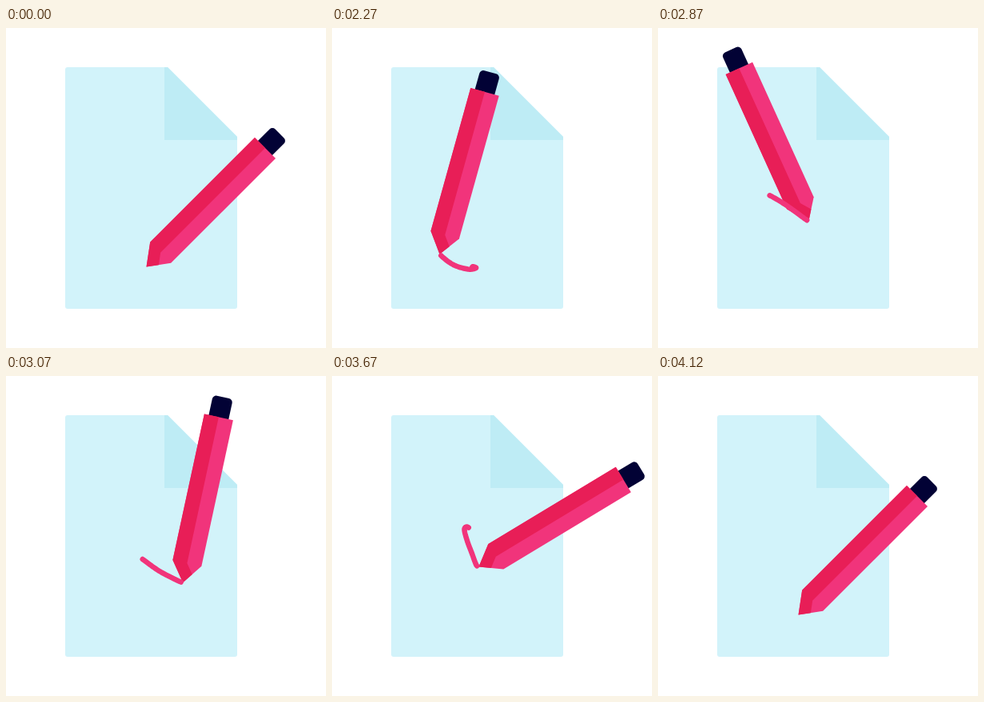
Recreate the animation shown at these times as an HTML page. Size 400 by 400 pixels, loop 4150 ms.

```html
<!DOCTYPE html>
<html lang="en">
<head>
<meta charset="utf-8">
<title>Pencil writing on a page</title>
<style>
  html, body { margin: 0; width: 100%; height: 100%; overflow: hidden; background: #fff; }
  svg { display: block; width: 100%; height: 100%; }
</style>
</head>
<body>
<svg viewBox="0 0 400 400">
  <path fill="#d2f3fa" d="M77 49H202L289 136V348Q289 351 286 351H77Q74 351 74 348V52Q74 49 77 49Z"/>
  <path fill="#beecf5" d="M198 49H202L289 136V140H198Z"/>
  <g id="pencil">
    <rect id="cap" x="-12.7" width="25.4" height="32" rx="5" fill="#020235"/>
    <path id="body" fill="#f1347b"/>
    <path id="shade" fill="#e81e57"/>
  </g>
  <path id="ink" fill="none" stroke="#f1347b" stroke-width="6.5" stroke-linecap="round" stroke-linejoin="round"/>
</svg>
<script>
const LOOP = 4150, START = 2020, END = 4095;
const TRAIL = 56, LAG = 2.5, STEP = 5;
const HALF = 18.4, POINT = 25;

// time, tip x, tip y
const tipKeys = [
  [1990, 175.5, 298.5], [2020, 176.5, 298.2], [2080, 180, 300], [2140, 170, 301.5],
  [2210, 150, 295], [2290, 130, 278], [2360, 115, 256], [2420, 104.5, 231],
  [2450, 103, 213], [2470, 105.3, 206], [2520, 107.5, 200.5], [2580, 112, 199],
  [2720, 137, 208], [2790, 158, 220], [2870, 188, 241.5], [2970, 207, 252],
  [3070, 221, 258.3], [3110, 222, 256], [3200, 208, 240], [3290, 191, 214],
  [3370, 173.3, 192.3], [3420, 168.5, 188.5], [3470, 165.5, 192], [3530, 169, 206],
  [3600, 175, 222], [3650, 180.5, 236.5], [3670, 183.3, 238.5], [3740, 190, 247],
  [3870, 190, 270], [4000, 181, 291], [END, 175.5, 298.5]
];
// time, degrees
const angleKeys = [
  [1990, 45], [2080, 42.5], [2180, 30], [2280, 14], [2370, -3], [2470, -18.5],
  [2520, -25], [2580, -27.5], [2720, -26.5], [2870, -24.5], [2970, -11],
  [3070, 12], [3200, 36], [3370, 55.5], [3520, 59.5], [3670, 58.9], [3870, 54], [END, 45]
];
// time, body length
const lengthKeys = [
  [1990, 185], [2290, 185], [2370, 170], [2470, 153.5], [2520, 143],
  [2580, 144], [2720, 155], [2790, 168], [2870, 185], [END, 185]
];

// Smooth curve through the keys; flat at both ends.
function spline(keys, t, c = 1) {
  const last = keys.length - 1;
  if (t <= keys[0][0]) return keys[0][c];
  if (t >= keys[last][0]) return keys[last][c];
  const i = keys.findIndex(k => k[0] > t) - 1;
  const slope = j => j <= 0 || j >= last ? 0 :
    (keys[j + 1][c] - keys[j - 1][c]) / (keys[j + 1][0] - keys[j - 1][0]);
  const a = keys[i], b = keys[i + 1], h = b[0] - a[0];
  const s = (t - a[0]) / h, s2 = s * s, s3 = s2 * s;
  return (2 * s3 - 3 * s2 + 1) * a[c] + (s3 - 2 * s2 + s) * h * slope(i) +
         (3 * s2 - 2 * s3) * b[c] + (s3 - s2) * h * slope(i + 1);
}

const tipAt = t => [spline(tipKeys, t, 1), spline(tipKeys, t, 2)];

// Tip path measured by distance travelled.
const trace = [];
for (let t = tipKeys[0][0], sum = 0; t <= END; t += STEP) {
  const [x, y] = tipAt(t), p = trace[trace.length - 1];
  if (p) sum += Math.hypot(x - p.x, y - p.y);
  trace.push({ x, y, sum });
}

function travelled(t) {
  const f = Math.min(Math.max((t - tipKeys[0][0]) / STEP, 0), trace.length - 1);
  const i = Math.floor(f), a = trace[i], b = trace[Math.min(i + 1, trace.length - 1)];
  return a.sum + (b.sum - a.sum) * (f - i);
}

function pointAt(d) {
  const i = Math.max(1, trace.findIndex(p => p.sum >= d));
  const a = trace[i - 1], b = trace[i], k = (d - a.sum) / (b.sum - a.sum || 1);
  return [a.x + (b.x - a.x) * k, a.y + (b.y - a.y) * k];
}

function inkPath(t) {
  const size = TRAIL * Math.min(1, Math.max(0, (END - 15 - t) / 260));
  const head = travelled(t) - LAG, tail = Math.max(0, head - size);
  if (t < START || head - tail < 1) return "";
  const mid = trace.filter(p => p.sum > tail && p.sum < head).map(p => [p.x, p.y]);
  return "M" + [pointAt(tail), ...mid, pointAt(head)]
    .map(p => p.map(n => n.toFixed(2)).join(" ")).join("L");
}

const $ = id => document.getElementById(id);
const pencil = $("pencil"), cap = $("cap"), body = $("body"), shade = $("shade"), ink = $("ink");

function draw(time) {
  const t = time < START ? 0 : time;
  const [x, y] = tipAt(t), top = -POINT - spline(lengthKeys, t);
  pencil.setAttribute("transform", `translate(${x} ${y}) rotate(${spline(angleKeys, t)})`);
  cap.setAttribute("y", top - 25.5);
  body.setAttribute("d", `M0 0L${-HALF} ${-POINT}V${top}H${HALF}V${-POINT}Z`);
  shade.setAttribute("d",
    `M0 0L${-HALF} ${-POINT}V${top}H0V${-POINT}L${HALF / 2} ${-POINT / 2}Z`);
  ink.setAttribute("d", inkPath(t));
}

const origin = performance.now();
function tick() {
  draw((performance.now() - origin) % LOOP);
  requestAnimationFrame(tick);
}
tick();
</script>
</body>
</html>
```
